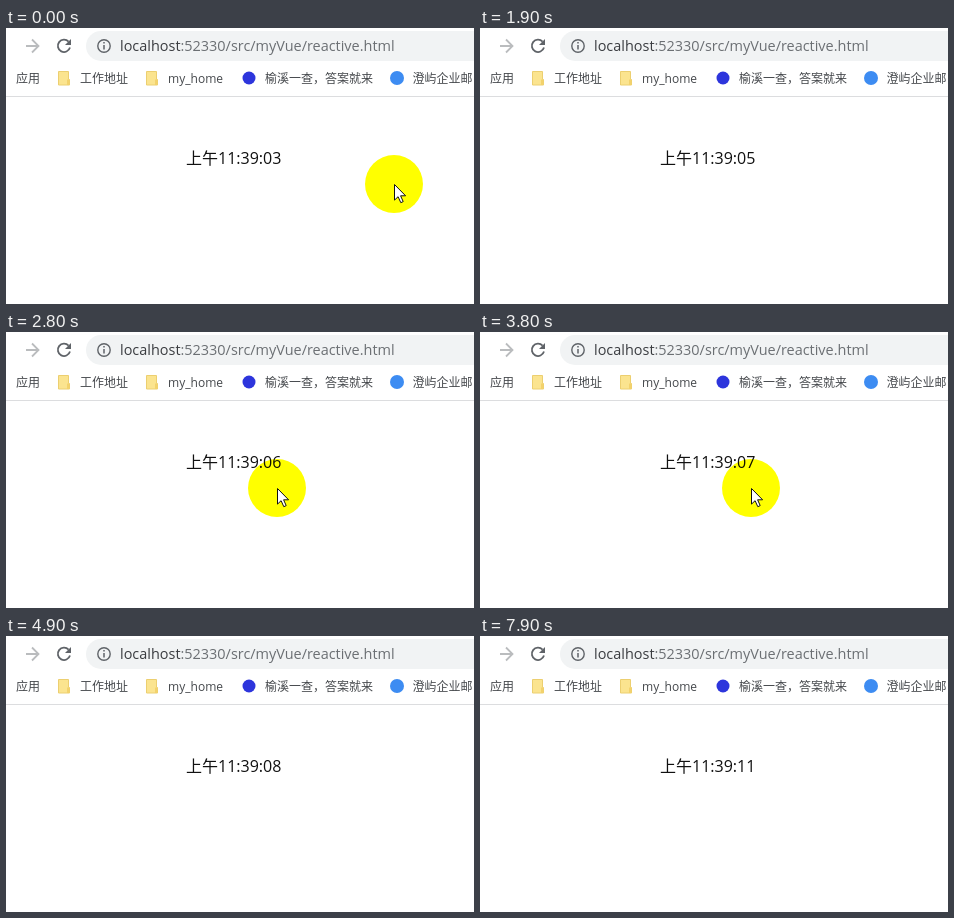
An HTML page for the animation above (8000 ms loop, 468 by 276 pixels).

```html
<!DOCTYPE html>
<html lang="zh-CN">
<head>
<meta charset="utf-8">
<title>reactive</title>
<style>
  html, body { margin: 0; width: 100%; height: 100%; overflow: hidden; background: #fff; }
  svg { display: block; width: 468px; height: 276px; }
  text { font-family: "Open Sans", "Noto Sans CJK SC", "Noto Sans CJK", sans-serif; white-space: pre; }
  .url { font-size: 14.45px; fill: #6b6f73; }
  .host { fill: #3a3c40; }
  .bookmarks { font-size: 12px; fill: #45484c; }
  #clock { font-size: 16px; fill: #111; }
  #halo { fill: #ff0; mix-blend-mode: multiply; }
</style>
</head>
<body>
<svg viewBox="0 0 468 276">
  <defs>
    <g id="folder">
      <path d="M.5.5h10v8h1v5.5H.5z" fill="#fbe48f" stroke="#eccf70"/>
      <path d="M9 8.5h2.5v5.5H9z" fill="#f3d26c"/>
    </g>
  </defs>
  <rect width="468" height="276" fill="#fff"/>

  <g fill="none" stroke-width="1.8">
    <path d="M20 18H32M26 11.5l6.5 6.5-6.5 6.5" stroke="#babcbe"/>
    <path d="M62.6 13.6A6.2 6.2 0 1 0 64 19.6" stroke="#5f6368"/>
  </g>
  <path d="M65 11v6h-6z" fill="#5f6368"/>

  <path d="M468 3H95a15 15 0 0 0 0 30H468z" fill="#f1f3f4"/>
  <circle cx="98" cy="18" r="6.2" fill="none" stroke="#5f6368" stroke-width="1.4"/>
  <path d="M98 17v4.5M98 14v1.6" stroke="#5f6368" stroke-width="1.5"/>
  <text class="url" x="114" y="23"><tspan class="host">localhost</tspan>:52330/src/myVue/reactive.html</text>

  <use href="#folder" x="52" y="43"/>
  <use href="#folder" x="140" y="43"/>
  <circle cx="243" cy="50" r="6.5" fill="#2d35dc"/>
  <circle cx="391" cy="50" r="7" fill="#3d8cf2"/>
  <g class="bookmarks">
    <text x="10" y="55">应用</text>
    <text x="74" y="55">工作地址</text>
    <text x="162" y="55">my_home</text>
    <text x="259" y="55">榆溪一查，答案就来</text>
    <text x="406.5" y="55">澄屿企业邮</text>
  </g>
  <path d="M0 68.5H468" stroke="#dcdddf"/>

  <text id="clock" x="180" y="136"></text>
  <g id="pointer">
    <circle id="halo" r="29"/>
    <path d="M.5.5v15.6l3.6-3.4 2.7 6 2.4-1.1-2.6-5.8h5z" fill="#fff" stroke="#111"/>
  </g>
</svg>
<script>
  const LOOP = 8000, STEP = 100, FIRST_TICK = 800;

  const linear = k => k;
  const easeIn = k => k ** 2;
  const easeOut = k => 1 - (1 - k) ** 3;

  // The pointer leaves, comes back to rest under the clock, then leaves again.
  const glides = [
    { start: 700, end: 1000, from: [388, 156], to: [422, 286], ease: easeIn, leaves: true },
    { start: 2300, end: 2900, from: [305, 234], to: [271, 156], ease: easeOut },
    { start: 4500, end: 4900, from: [285, 160], to: [465, 288], ease: linear, leaves: true }
  ];

  const clock = document.getElementById("clock");
  const pointer = document.getElementById("pointer");

  function drawClock(t) {
    const second = 4 + Math.floor((t - FIRST_TICK) / 1000);
    clock.textContent = "上午11:39:" + String(second).padStart(2, "0");
  }

  function drawPointer(t) {
    const { start, end, from, to, ease, leaves } = glides.findLast(g => g.start <= t) ?? glides[0];
    const k = Math.min(1, Math.max(0, (t - start) / (end - start)));
    const [x, y] = from.map((a, i) => Math.round(a + (to[i] - a) * ease(k)));
    pointer.style.display = leaves && k === 1 ? "none" : "";
    pointer.setAttribute("transform", `translate(${x} ${y})`);
  }

  const origin = performance.now();
  function tick() {
    const elapsed = (performance.now() - origin) % LOOP;
    const t = Math.floor(elapsed / STEP) * STEP;
    drawClock(t);
    drawPointer(t);
    requestAnimationFrame(tick);
  }
  tick();
</script>
</body>
</html>
```
